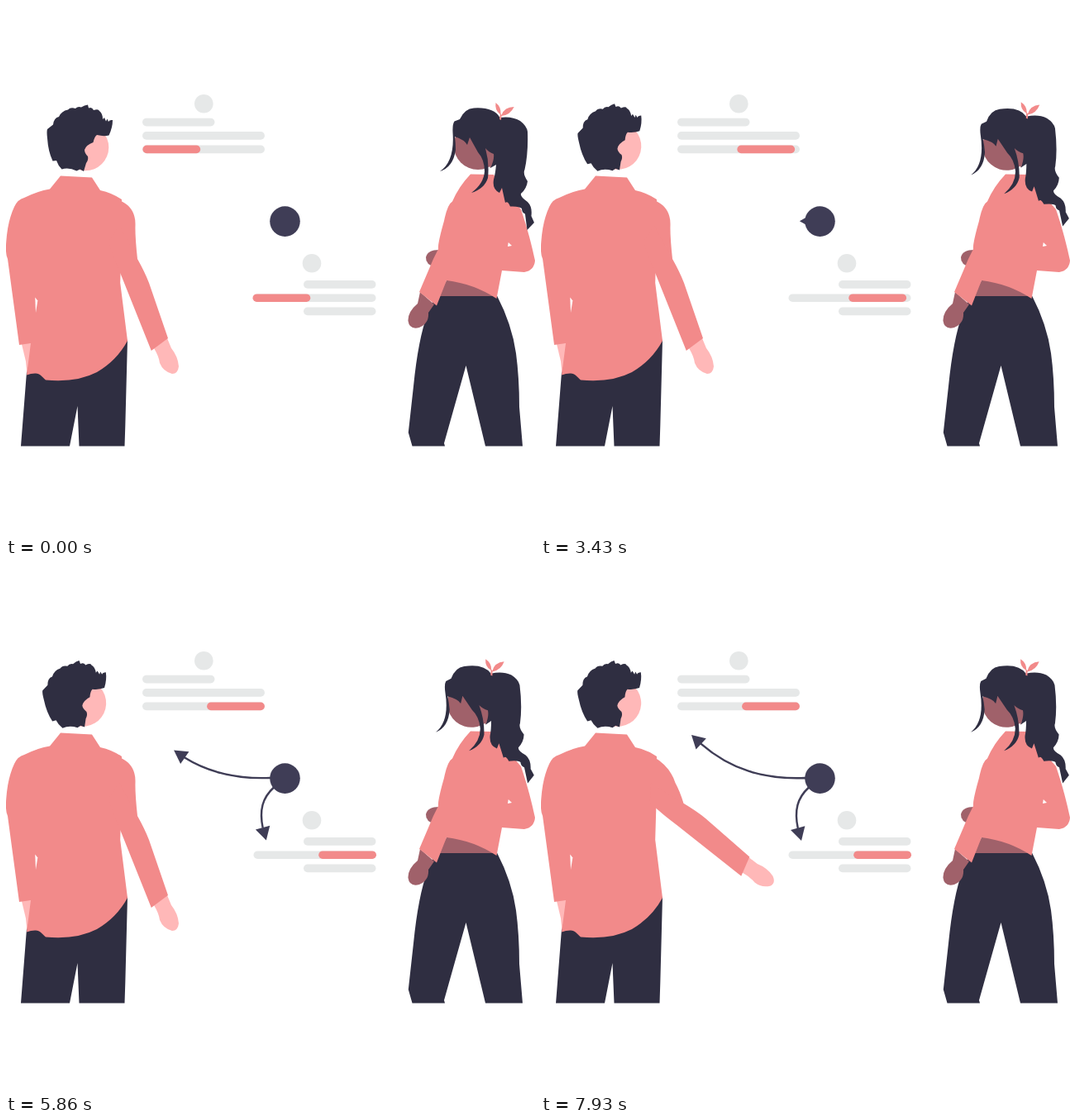
An HTML page for the animation above (8 s loop, 640 by 640 pixels).

```html
<!DOCTYPE html>
<html lang="en">
<head>
<meta charset="utf-8">
<title>Conversation</title>
<style>
html, body { margin: 0; width: 100%; height: 100%; overflow: hidden; background: #fff; }
svg { display: block; width: 100%; height: 100%; }
.navy { fill: #2f2e41; }
.ink { fill: #3f3d56; }
.pink { fill: #f28a8a; }
.fair { fill: #ffb8b8; }
.dark { fill: #a0616a; }
.grey { fill: #e6e8e8; }
.line { fill: none; stroke: #3f3d56; stroke-width: 2.4; }
</style>
</head>
<body>
<svg viewBox="0 0 640 640">
  <g class="grey">
    <circle cx="239.3" cy="118.2" r="11.3"/>
    <rect x="165" y="135.8" width="87.5" height="9.6" rx="4.8"/>
    <rect x="165" y="152.1" width="148" height="9.6" rx="4.8"/>
    <rect x="165" y="168.6" width="148" height="9.6" rx="4.8"/>
    <circle cx="370" cy="311.3" r="11.3"/>
    <rect x="360" y="332.1" width="87.5" height="9.6" rx="4.8"/>
    <rect x="299.5" y="348.4" width="148" height="9.6" rx="4.8"/>
    <rect x="360" y="364.6" width="87.5" height="9.6" rx="4.8"/>
  </g>
  <rect id="barA" class="pink" y="168.6" width="69.8" height="9.6" rx="4.8"/>
  <rect id="barB" class="pink" y="348.4" width="69.8" height="9.6" rx="4.8"/>

  <g id="arrowA">
    <path class="line" d="M337 260.5L319 260C265 262 222 248 182 208"/>
    <path class="ink" d="M0 0L-16 -9V9Z"/>
  </g>
  <g id="arrowB">
    <path class="line" d="M337 260.5L324 271.5C307 287 305 306 315 336"/>
    <path class="ink" d="M0 0L-16 -9V9Z"/>
  </g>
  <circle class="ink" cx="337.5" cy="260.6" r="18.3"/>

  <g id="man">
    <path class="navy" d="M26 430L18 532.5H77L86.5 484L88.5 532.5H143.5L144.3 508L147 404L100 390Z"/>
    <path class="fair" d="M18 405H32L25.5 446L24 430Z"/>
    <path class="pink" d="M66 205.5L104 207.5L114 223Q128 226 140 234L139.5 290L138.2 335L147 405Q134 429 110 443Q85 456 48 452.5C43 448 41 444 35 444.5Q30 444.5 25 446.5L30 408L16 410L2 306Q-1 300 .3 285Q2 260 10 243Q14 234 22 232Q38 224 53 221.5Z"/>
    <path fill="#fff" d="M35.2 352.5L38.3 356.5L36 371Z"/>
    <path id="shoulder" class="pink"/>
    <g id="arm">
      <path class="fair" d="M179 414L195 402L200 414Q208 424 209 436Q208 445 201 445Q190 442 186 432Q185 424 179 414Z"/>
      <path class="pink" d="M159 306Q168 322 173 335L196 402L175.8 417L139 325Q131 308 124 285L137 265Z"/>
    </g>
    <g id="manHead">
      <circle class="fair" cx="96" cy="171" r="28.3"/>
      <path class="navy" d="M50 149L57 143.5Q58 135 64 134Q67 127 75 125.5Q78 122 84 124Q87 121 91 122.5Q95 120 99 119.5L100 123.5Q104 122 106 126Q112 124 113 127Q117 130 117 137L119 135L121 139.5L122.5 136.5L124 140Q125 137.5 129 138Q129 147 124.5 156.5Q118 158 110 156Q107 158 105.5 165Q97 168 95 174Q95 178 99 182Q100 186 97 190L94 200L89.5 197.5L85.5 199.5Q76 195 67.5 197.5Q63 193 61 187L56.5 187.5Q51 176 50 160Q49 152 50 149Z"/>
    </g>
  </g>

  <g id="woman">
    <path class="navy" d="M521 350.5H594Q612 385 617 420Q621 450 621 485L625 532.5H580L556.5 435L530 529L531 532.5H491.5L486.8 516L493 460Q499 400 511 370Q515 358 521 350.5Z"/>
    <path class="dark" d="M534 330L523 351H594L580 335Z"/>
    <path class="dark" d="M501 346L518 361L511 371Q512 384 500 389Q488 392 486.5 381Q486 370 498 360Z"/>
    <path class="dark" d="M524 295Q510 295 508 304Q508 314 519 315Z"/>
    <path class="pink" d="M562 203.5L590 204L596 215L623 246Q633 275 640 308Q639 320 627 322L600 320L593.5 354Q566 336 533 332L521 362.5L500 346L517 306L523 294Q522 288 530 260Q534 240 540 236.5Q548 218 562 203.5Z"/>
    <path fill="#fff" d="M607.8 286L612 290L607 291Z"/>
    <g id="womanHead">
      <circle class="dark" cx="571" cy="168.7" r="29.3"/>
      <path class="dark" d="M575 176H591V187L586 196Z"/>
      <path class="navy" d="M540.5 153Q540 143 542.5 139.5L549 137Q555 124 566 123.5Q590 122 597.5 135Q612 133 622 139Q630 145 631 152Q632 178 627.5 198Q625 203 631 212Q630 221 623 227Q622 231 631 237Q637 243 635.5 254L639 262L630.5 271L628 251.500Q624 250 624 245Q621 242 610 242.5Q607 235 604 238L600 220L597 226Q588 222 590 210Q592 203 593 192L586 196Q591 186 590 179Q584 177 580 172Q585 190 583 208Q579 221 563 226Q578 215 579 200Q579 186 571 177L561 159L558 168Q555 162 543 158Q544 166 544 174Q541 195 525 200Q543 188 540.5 153Z"/>
      <path class="pink" d="M597.8 131Q591 126 592.5 117Q599 122 598.500 130L599.5 132Q603 122 614.700 122Q610 132 599.5 133L599 138L597 137Z"/>
    </g>
  </g>
</svg>
<script>
const LOOP = 8000;
const $ = id => document.getElementById(id);
const progress = (t, from, to) => Math.min(1, Math.max(0, (t - from) / (to - from)));
const sine = p => (1 - Math.cos(Math.PI * p)) / 2;
const mix = (a, b, p) => a + (b - a) * p;
const rotate = (id, deg, x, y) => $(id).setAttribute('transform', `rotate(${deg} ${x} ${y})`);

function arrow(id, first, p) {
  const [line, head] = $(id).children;
  const total = line.getTotalLength();
  const pos = mix(first, total, p);
  const base = Math.max(0, pos - 15.5);
  const a = line.getPointAtLength(base), b = line.getPointAtLength(pos);
  const deg = Math.atan2(b.y - a.y, b.x - a.x) * 180 / Math.PI;
  line.setAttribute('stroke-dasharray', `${base} ${total + 20}`);
  head.setAttribute('transform', `translate(${b.x} ${b.y}) rotate(${deg})`);
}

function moveArm(p) {
  const px = 137, py = 273, deg = 29.8 * p, rad = deg * Math.PI / 180;
  rotate('arm', -deg, px, py);
  // The shoulder skin joins the fixed torso to the turning elbow.
  const ex = px + 22 * Math.cos(rad) + 33 * Math.sin(rad);
  const ey = py - 22 * Math.sin(rad) + 33 * Math.cos(rad);
  const sx = mix(156.5, 162.5, p), sy = mix(265, 266, p);
  $('shoulder').setAttribute('d',
    `M137 235Q${mix(157, 156, p)} ${mix(243, 246, p)} ${sx} ${sy}` +
    `Q${mix(156, 168, p)} ${mix(278, 276, p)} ${ex} ${ey}L137 ${mix(300, 292, p)}Z`);
}

function draw(t) {
  const slide = progress(t, 1200, 3610);
  $('barA').setAttribute('x', mix(165.4, 243.1, slide));
  $('barB').setAttribute('x', mix(298.5, 378.2, slide));

  const turn = sine(progress(t, 1200, 3790));
  rotate('manHead', -8.2 * turn, 84, 192);
  rotate('womanHead', -4.9 * turn, 577, 261);

  arrow('arrowA', 16, sine(progress(t, 2800, 7060)));
  arrow('arrowB', 6, sine(progress(t, 4050, 5960)));

  moveArm(progress(t, 7220, 7930) ** 1.35);
}

const start = performance.now();
function tick() {
  draw((performance.now() - start) % LOOP);
  requestAnimationFrame(tick);
}
tick();
</script>
</body>
</html>
```
